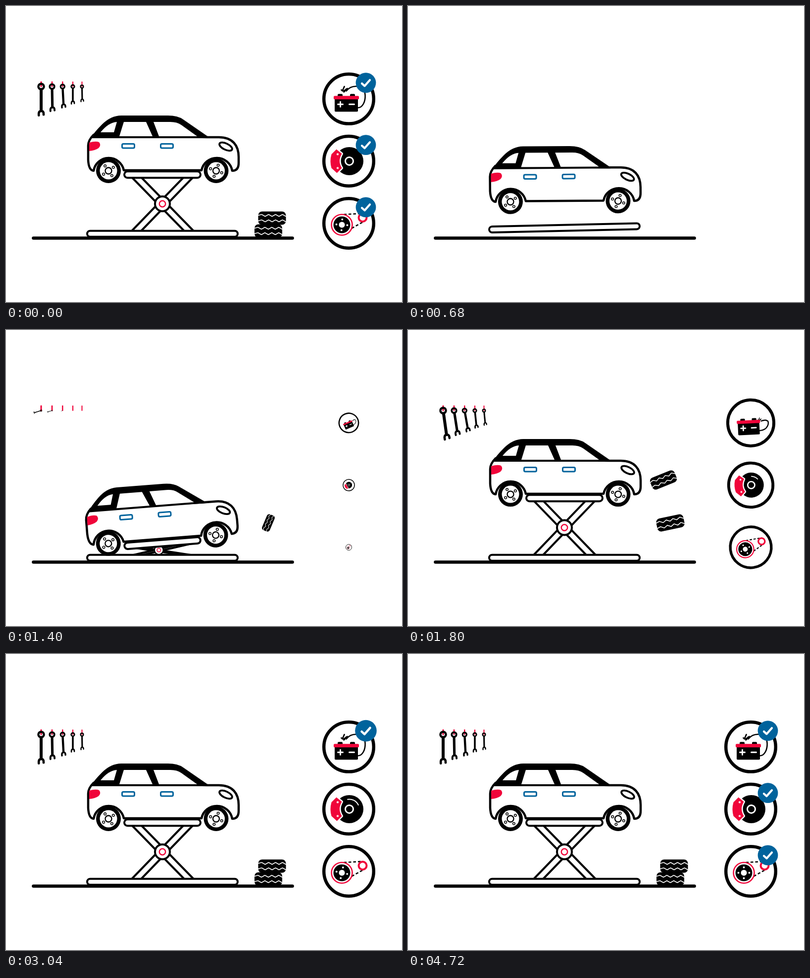
An HTML page with a canvas that plays this animation: 800 by 600 pixels, repeating every 4760 ms.

```html
<!DOCTYPE html>
<html lang="en">
<head>
<meta charset="utf-8">
<title>Garage</title>
<style>
html, body { margin: 0; width: 100%; height: 100%; overflow: hidden; background: #fff; }
canvas { display: block; width: 800px; height: 600px; }
</style>
</head>
<body>
<canvas id="stage" width="800" height="600"></canvas>
<script>
const ctx = document.getElementById('stage').getContext('2d');
const LOOP = 4760, STEP = 40;
const BLACK = '#000', WHITE = '#fff', RED = '#f0053a', BLUE = '#00639c';
const rad = deg => deg * Math.PI / 180;
const linear = u => u;
const smooth = u => u * u * (3 - 2 * u);

// Keys are a flat list: time, value, time, value, ...
function key(t, k, ease = smooth) {
  if (t <= k[0]) return k[1];
  for (let i = 2; i < k.length; i += 2) {
    if (t < k[i]) {
      const u = (t - k[i - 2]) / (k[i] - k[i - 2]);
      return k[i - 1] + (k[i + 1] - k[i - 1]) * ease(u);
    }
  }
  return k[k.length - 1];
}

function at(x, y, deg, scale, draw) {
  if (scale <= 0) return;
  ctx.save();
  ctx.translate(x, y);
  ctx.rotate(rad(deg));
  ctx.scale(scale, scale);
  draw();
  ctx.restore();
}

function paint(path, fill, stroke, width) {
  if (fill) { ctx.fillStyle = fill; ctx.fill(path); }
  if (stroke) { ctx.strokeStyle = stroke; ctx.lineWidth = width; ctx.stroke(path); }
}
const shape = (d, fill, stroke, width) => paint(new Path2D(d), fill, stroke, width);

function disc(x, y, r, fill, stroke, width) {
  const p = new Path2D();
  p.arc(x, y, r, 0, Math.PI * 2);
  paint(p, fill, stroke, width);
}

function box(x, y, w, h, r, fill, stroke, width) {
  const p = new Path2D();
  p.roundRect(x, y, w, h, r);
  paint(p, fill, stroke, width);
}

function bolts(radius, turn, draw) {
  for (let i = 0; i < 4; i++) {
    const a = rad(turn + i * 90);
    draw(radius * Math.cos(a), radius * Math.sin(a));
  }
}

// ---- wrenches ----
function wrench(t, x, size, rest, i) {
  const pin = key(t, [1160, 0, 1320, 1]);
  const grow = key(t - i * 40, [1280, 0, 1400, .27, 1520, .8, 1680, 1]);
  const swing = key(t - i * 8, [1280, 82, 1400, 73, 1520, 62, 1680, 12, 1800, -8,
    1870, -9, 2100, 4, 2400, -2, 2700, 1, 3000, 0]);
  if (pin > 0) shape(`M${x} 154V${154 + 9 * pin}`, null, RED, 1 + 2 * size);
  at(x, 163.3, swing + rest, grow * size, () => {
    disc(0, 0, 5.6, null, BLACK, 4.4);
    shape('M0 6V49', null, BLACK, 6);
    shape('M-4.8 58.5L-4.8 54Q-4 49.5 0 49.5Q4 49.5 4.8 53L5 57', null, BLACK, 4.6);
  });
}

// ---- car ----
function wheel(x, turn) {
  disc(x, 334, 25, BLACK);
  disc(x, 334, 17.5, WHITE);
  disc(x, 334, 6.5, null, BLACK, 2.3);
  bolts(12, turn, (dx, dy) => disc(x + dx, 334 + dy, 2.3, null, BLACK, 1.5));
}

function car() {
  shape('M177 334Q167 333 166 312V283Q166 272 177 261L407 266H430C458 266 470 283 470 306' +
    'V318Q470 334 457 334A31.5 31 0 0 0 395 333H238A31 31 0 0 0 177 334Z', WHITE, BLACK, 4.5);
  shape('M171 268Q178 256 194 240Q212 222 233 222H327Q347 222 358 230L410 266V268Z', BLACK);
  shape('M191 256Q207 236 224 235L218 256Z', WHITE);
  shape('M238 235H283L296 264H229Z', WHITE);
  shape('M298 235H332Q346 235 354 241L386 264H309Z', WHITE);
  shape('M168 277Q181 273 188 276Q193 282 187 288Q180 293 168 294Z', RED);
  for (const x of [234.5, 312.5]) box(x, 279.5, 25, 8.5, 2.5, WHITE, BLUE, 3);
  const lamp = new Path2D();
  lamp.ellipse(444, 285, 14, 6.3, rad(26), 0, Math.PI * 2);
  paint(lamp, WHITE, BLACK, 3.8);
  wheel(207, 55);
  wheel(424.5, 20);
}

// ---- lift ----
function lift(t) {
  const rise = key(t, [1290, 0, 1400, .07, 1540, .55, 1680, .94, 1760, 1.01, 1800, 1.01, 1920, 1]);
  const fall = key(t, [700, 62, 820, 97, 890, 90, 970, 97]);
  const dy = fall - 97 * rise;
  const tilt = key(t, [40, -30, 400, -4, 680, -.4, 820, 0, 890, -1.2, 970, 0,
    1290, 0, 1400, -4.5, 1640, 0]);
  const carSize = key(t, [0, 0, 160, .18, 320, .62, 440, .88, 600, 1]);
  const deck = key(t, [1040, 0, 1240, 1]);
  const baseSize = key(t, [160, 0, 360, .55, 560, 1]);

  if (t > 1290) {
    const under = x => 346 + dy + (x - 316) * Math.tan(rad(tilt));
    for (const [top, foot] of [[262.5, 370.5], [369.5, 262.5]]) {
      const y = under(top);
      shape(`M${top - 9.5} ${y}H${top + 9.5}L${foot + 9.5} 457H${foot - 9.5}Z`, WHITE, BLACK, 4);
    }
  }
  const drop = key(t, [690, -12, 800, 0, 850, -3, 910, 0]);
  const lean = key(t, [160, -30, 440, -8, 680, -1.3, 800, 0]);
  at(316, 461.7 + drop, lean, baseSize, () => box(-152, -6, 304, 12, 6, WHITE, BLACK, 4));
  at(316 + tilt * 1.6 * (t > 1290), 401 + dy / 2, 0, key(t, [1300, 0, 1400, .6, 1600, 1]), () => {
    disc(0, 0, 15, WHITE, BLACK, 4);
    disc(0, 0, 6.2, WHITE, RED, 2.5);
  });
  at(316, 341 + dy, tilt, carSize, () => {
    ctx.translate(-316, -341);
    car();
    if (deck > 0) box(316 - 77 * deck, 335.2, 154 * deck, 13, 6.5, WHITE, BLACK, 4);
  });
}

// ---- tyres ----
function tyre(x, y, deg, size) {
  at(x, y, deg, size, () => {
    box(-28, -13.5, 56, 27, 8, BLACK);
    for (const row of [-5.5, 5.5]) {
      let d = `M-28 ${row}`;
      for (let i = 1; i <= 8; i++) d += `L${-28 + i * 7} ${row + (i % 2 ? -2 : 2)}`;
      shape(d, null, WHITE, 1.6);
    }
  });
}

function tyres(t) {
  tyre(530, key(t, [1840, 391, 2040, 456, 2120, 450, 2200, 456]),
    key(t, [1240, -90, 1400, -67, 1800, -12, 1960, 0]),
    key(t, [1240, 0, 1400, .62, 1600, 1]));
  tyre(key(t, [1840, 516, 2160, 537.5]),
    key(t, [1880, 304, 2160, 430, 2230, 424, 2300, 430]),
    key(t, [1420, -90, 1800, -22, 2000, 0]),
    key(t, [1420, 0, 1800, .95, 1900, 1]));
}

// ---- service icons, drawn around their own centres ----
function battery(t) {
  const sway = t > 3040 ? Math.sin(Math.PI * (t - 3040) / 1680) ** 2 : 0;
  const x = key(t, [1800, 20, 2320, -8]) + 5 * sway;
  const y = key(t, [1800, -7, 2320, -20]) - 3 * sway;
  const reach = key(t, [1800, 38, 2320, 36]) + 4 * sway;
  const crest = key(t, [1800, -7, 2320, -29]);
  shape(`M18 18C${reach} 18 ${reach + 3} ${crest + 6} ${(reach + x) / 2 + 7} ${crest + 4}` +
    `Q${x + 12} ${crest + 1} ${x + 3} ${y + 4}`, null, BLACK, 2.6);
  at(x, y, 0, key(t, [1640, 0, 1800, .6, 2320, 1]), () => {
    shape('M-1 -5L-5 4M-7 2L-2 4L3 0M-2 6L5 -1', null, BLACK, 2.8);
  });
  box(-22.5, -10, 10, 8, 2, BLACK);
  box(2.5, -10, 10, 8, 2, BLACK);
  box(-28.5, -2, 47, 28, 2, BLACK);
  box(-30.5, -6, 51, 7, 2, RED);
  shape('M-22 11H-12M-17 6V16M1 11H11', null, WHITE, 3);
}

function brake(t) {
  disc(1, 0, 28.5, BLACK);
  disc(1, 0, 8, null, WHITE, 3);
  const shine = key(t, [1500, 0, 1800, 45, 2600, 75, 3040, 75, 3700, 0]);
  if (shine > 0) {
    const p = new Path2D();
    p.arc(1, 0, 20, rad(-62 - shine / 2), rad(-62 + shine / 2));
    paint(p, null, WHITE, 2);
  }
  const caliper = 'M-25 -24L-14 -15Q-23 0 -14 14L-24 24L-35 14Q-39 0 -35 -14Z';
  shape(caliper, RED, WHITE, 5);
  shape(caliper, RED);
  for (const y of [-14, 14]) disc(-22.5, y, 2.2, '#ffd9e0');
}

function belt(t) {
  ctx.setLineDash([5.5, 4]);
  ctx.lineCap = 'butt';
  shape('M-10 -18L27 -20M6 10L31 -4', null, BLACK, 2.6);
  ctx.setLineDash([]);
  ctx.lineCap = 'round';
  disc(-14, 3, 21, null, RED, 2.6);
  disc(-14, 3, 17, BLACK);
  disc(-14, 3, 6, WHITE);
  bolts(11, (t - 4720) * .1, (x, y) => disc(x - 14, y + 3, 1.9, WHITE));
  disc(28, -11.5, 8, WHITE, RED, 4);
}

function icon(t, i, draw) {
  const y = 188.3 + 126.1 * i;
  const size = key(t - i * 80, [1080, 0, 1120, .05, 1240, .12, 1320, .23, 1400, .39, 1520, .685,
    1640, .824, 1720, .89, 1800, .926, 2180, 1], linear);
  at(692.5, y, -38 * (1 - size), size, () => {
    disc(0, 0, 50.3, WHITE, BLACK, 6.5);
    draw(t);
  });
  const pop = key(t - i * 440, [2740, 0, 2800, .4, 2920, 1.12, 2980, 1.12, 3040, 1.07, 3160, 1]);
  at(727, y - 32.7, 0, pop, () => {
    disc(0, 0, 20.4, BLUE);
    shape('M-8 1.5L-2.5 6.5L8 -5.5', null, WHITE, 4.2);
  });
}

function draw(t) {
  ctx.fillStyle = WHITE;
  ctx.fillRect(0, 0, 800, 600);
  ctx.lineCap = ctx.lineJoin = 'round';
  [[71, 1, 0], [93, .85, -1], [114.3, .73, -3], [135, .6, 0], [153.5, .52, -1]]
    .forEach(([x, size, rest], i) => wrench(t, x, size, rest, i));
  lift(t);
  shape('M55.5 470.5H578.5', null, BLACK, 6.6);
  tyres(t);
  [battery, brake, belt].forEach((art, i) => icon(t, i, art));
}

const start = performance.now();
function frame() {
  const t = Math.floor((performance.now() - start) % LOOP / STEP) * STEP;
  // The loop opens on the finished scene, then cuts to the empty floor.
  draw(t < STEP ? LOOP : t);
  requestAnimationFrame(frame);
}
frame();
</script>
</body>
</html>
```
